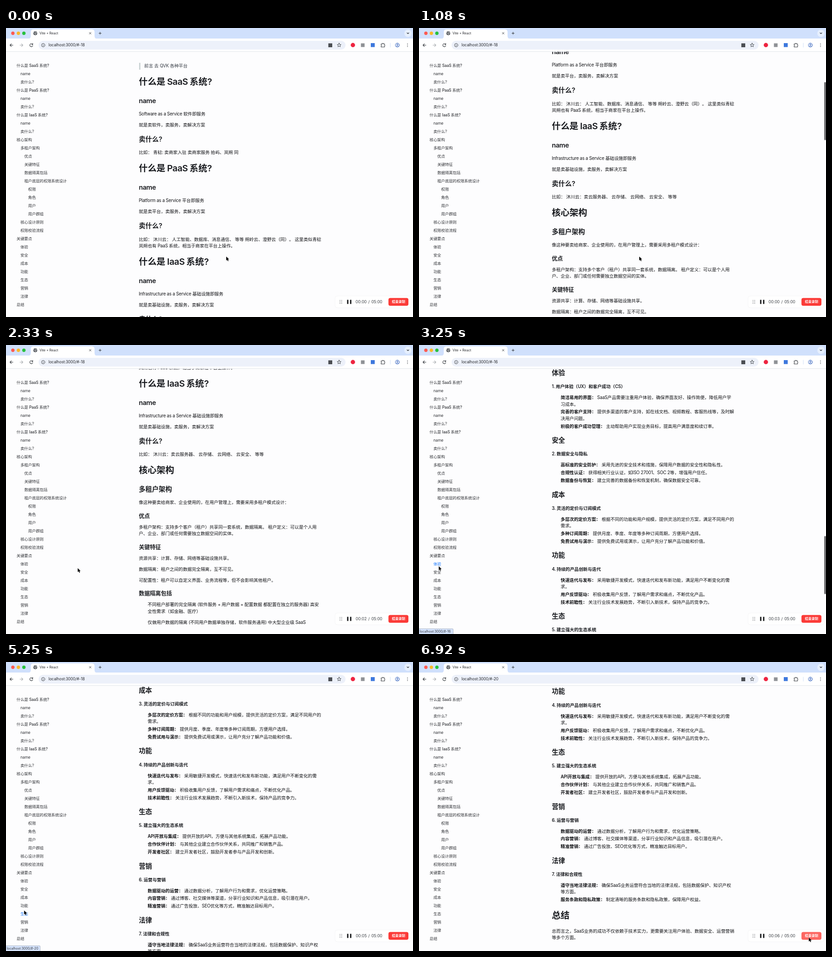
An HTML page that plays this animation: 887 px wide and 631 px high, repeating every 7.16 s.

```html
<!DOCTYPE html>
<html lang="zh-CN">
<head>
<meta charset="utf-8">
<title>Vite + React</title>
<style>
html, body { margin: 0; width: 100%; height: 100%; overflow: hidden; background: #fdfdfe; }
body { position: relative; font-family: Inter, "Noto Sans CJK SC", "Noto Sans CJK", sans-serif; text-spacing-trim: space-all; }
#page, #doc, #ui, #cursor, #thumb, #tip, #widget, .t { position: absolute; left: 0; top: 0; }
#page { top: 52px; width: 887px; height: 579px; overflow: hidden; }
#doc { will-change: transform; }
#ui, #widget { width: 887px; height: 631px; }
#thumb { left: 883px; width: 4px; height: 126.5px; border-radius: 2px; background: #717173; }
#tip { top: 619px; width: 75px; height: 12px; background: #d5e3fc; border: solid #b4bdcc; border-width: 1px 1px 0 0;
  border-radius: 0 3px 0 0; box-sizing: border-box; overflow: hidden; }
.t { white-space: pre; line-height: 20px; }
.t i { font-style: normal; letter-spacing: var(--track); }
.t b { font-weight: 600; }
.h1 i { word-spacing: -.03em; }
.right { left: auto; text-align: right; }
</style>
</head>
<body>
<div id="page"><div id="doc"></div></div>
<div id="side"></div>
<div id="thumb"></div>

<svg id="ui" viewBox="0 0 887 631" fill="none" stroke-linecap="round" stroke-linejoin="round">
  <path d="M0 0H887V24H0Z" fill="#d0e0fc"/>
  <path d="M0 23H887V51H0Z" fill="#fff"/>
  <path d="M0 51.5H887" stroke="#e2e5ea"/>
  <path d="M48 23.5Q54 23.5 54 17.5V9Q54 3 60 3H187Q193 3 193 9V17.5Q193 23.5 199 23.5Z" fill="#fff"/>
  <circle cx="15" cy="11.5" r="3.7" fill="#ff5b52"/>
  <circle cx="27" cy="11.5" r="3.7" fill="#f9b829"/>
  <circle cx="39" cy="11.5" r="3.7" fill="#27c13f"/>
  <circle cx="63.8" cy="11.5" r="4.4" fill="#55595e"/>
  <path d="M60.5 10.6C62.5 11 62.8 12 64 12.2S63.8 14 63.5 15M63.6 7.9C63.3 9.4 65.3 9.2 65.2 10.4S66.8 11.2 67.3 10.8" stroke="#fff" stroke-width="1"/>
  <g stroke="#33363b" stroke-width="1">
    <path d="M181.7 9.7L185.3 13.3M185.3 9.7L181.7 13.3M202.5 11.5H207.5M205 9V14"/>
  </g>
  <circle cx="876" cy="11.5" r="8" fill="#e6effe"/>
  <path d="M874 10.5L876 12.5L878 10.5" stroke="#33363b" stroke-width="1.1"/>
  <rect x="71" y="28" width="669" height="19" rx="9.5" fill="#edf1fa"/>
  <path d="M15.2 37.5H8.8M11.7 34.5L8.7 37.5L11.7 40.5" stroke="#3c4045" stroke-width="1.1"/>
  <path d="M30.3 37.5H36.7M33.8 34.5L36.8 37.5L33.8 40.5" stroke="#aeb1b5" stroke-width="1.1"/>
  <path d="M58 35.8A3.3 3.3 0 1 0 58.3 38.6M58.4 33.8V36.2H56" stroke="#3c4045" stroke-width="1.1"/>
  <circle cx="81" cy="37.5" r="3.7" stroke="#3c4045" stroke-width=".9"/>
  <path d="M81 37.3V39.3M81 35.6V35.7" stroke="#3c4045" stroke-width="1"/>
  <rect x="702.5" y="33.5" width="8.5" height="8.5" fill="#4a4d52"/>
  <path id="star" stroke="#3c4045" stroke-width=".9"/>
  <circle cx="756" cy="37.3" r="4.7" fill="#ee2440"/>
  <rect x="773.5" y="33.5" width="8" height="8" fill="#8f9296"/>
  <rect x="795" y="33" width="8.6" height="8.6" fill="#3d78dd"/>
  <path d="M817.5 34.7H820.2A1.3 1.3 0 0 1 822.8 34.7H825V37A1.3 1.3 0 0 1 825 39.3V41.5H817.5V39.3A1.2 1.2 0 0 0 817.5 37Z" stroke="#3c4045" stroke-width="1.1"/>
  <path d="M837.5 33V42" stroke="#d3e0f8"/>
  <g stroke="#2456b8" stroke-width=".9">
    <circle cx="853" cy="37.3" r="4.4"/><circle cx="853" cy="36.2" r="1.5"/><path d="M850 40.2Q853 37.8 856 40.2"/>
  </g>
  <path d="M875 34.2V34.2M875 37.3V37.3M875 40.4V40.4" stroke="#3c4045" stroke-width="1.6"/>
</svg>

<svg id="widget" viewBox="0 0 887 631">
  <rect x="716.5" y="584.5" width="167" height="27" rx="6" fill="#000" opacity=".035"/>
  <rect x="717.5" y="585.5" width="165" height="25" rx="5" fill="#fff"/>
  <path d="M728 594.7V594.7M731.6 594.7V594.7M728 598V598M731.6 598V598M728 601.3V601.3M731.6 601.3V601.3" stroke="#55585d" stroke-width="1.6" stroke-linecap="round"/>
  <path d="M743.3 593.5H746.3V602.5H743.3ZM749.7 593.5H752.7V602.5H749.7Z" fill="#1d1e20"/>
  <rect id="stop" x="833.5" y="589.5" width="43.5" height="17" rx="4"/>
</svg>
<div id="labels"></div>
<div id="tip"></div>
<svg id="cursor" width="12" height="16" viewBox="-2 -2 12 16" overflow="visible">
  <path d="M0 0V8.7L2 6.9L3.4 10.1L5 9.4L3.6 6.3H6.3Z" fill="#000" stroke="#fff" stroke-width=".9" paint-order="stroke"/>
</svg>

<script>
const $ = id => document.getElementById(id);
const LOOP = 7160, FPS = 12;

// One line of text, centred vertically on y; Latin runs get their own tracking.
function text(parent, x, y, size, str, { weight = 400, color = '#3c4045', track = -.01, cls = '' } = {}) {
  const el = document.createElement('div');
  el.className = 't ' + cls;
  el.style.cssText = `top:${y - 10}px;font-size:${size}px;font-weight:${weight};color:${color};--track:${track}em;` +
    (cls === 'right' ? `right:${887 - x}px` : `left:${x}px`);
  parent.append(el);
  el.put = s => {
    if (s !== el.raw) el.innerHTML = (el.raw = s).replace(/^[^：]*：(?= )/, m => cls === 'l' ? `<B>${m}</B>` : m)
      .replace(/<\/?B>|[ -;=?-~]+/g, m => m[0] === '<' ? m.toLowerCase() : `<i>${m}</i>`);
  };
  el.put(str);
  return el;
}

// Article: the first letter of each line is its kind (w, v: wrapped lines; m: spaced item).
const intro = `q前言 去 QVK 各种平台
1什么是 SaaS 系统?
2name
pSoftware as a Service 软件即服务
p就是卖软件，卖服务，卖解决方案
2卖什么?
p比如： 青稔: 卖商家入驻 卖商家服务 拾屿、岚朔 同
1什么是 PaaS 系统?
2name
pPlatform as a Service 平台即服务
p就是卖平台，卖服务，卖解决方案
2卖什么?
p比如： 沐川云： 人工智能、数据库、消息通信、 等等 朔岭云、澄野云（同）。 这里类似青稔
w岚朔也有 PaaS 系统，相当于商家在平台上操作。
1什么是 IaaS 系统?
2name
pInfrastructure as a Service 基础设施即服务
p就是卖基础设施，卖服务，卖解决方案
2卖什么?
p比如： 沐川云：卖云服务器、 云存储、 云网络、 云安全、 等等
1核心架构
2多租户架构
p像这种要卖给商家、企业使用的，在用户管理上，需要采用多租户模式设计：
3优点
p多租户架构：支持多个客户（租户）共享同一套系统，数据隔离。 租户定义：可以是个人用
w户、企业、部门或任何需要独立数据空间的实体。
3关键特征
p资源共享：计算、存储、网络等基础设施共享。
p数据隔离：租户之间的数据完全隔离，互不可见。
p可配置性：租户可以自定义界面、业务流程等，但不会影响其他租户。
3数据隔离包括
l不同租户部署的完全隔离 (软件服务 + 用户数据 + 配置数据 都配置在独立的服务器) 高安
v全性需求（如金融、医疗）
m仅做用户数据的隔离 (不同用户数据单独存储，软件服务通用) 中大型企业级 SaaS`;

const points = `2体验
41. 用户体验（UX）和客户成功（CS）
l简洁易用的界面： SaaS产品需要注重用户体验，确保界面友好、操作简便，降低用户学
v习成本。
l完善的客户支持： 提供多渠道的客户支持，如在线文档、视频教程、客服热线等，及时解
v决用户问题。
l积极的客户成功管理： 主动帮助用户实现业务目标，提高用户满意度和续订率。
2安全
42. 数据安全与隐私
l高标准的安全防护： 采用先进的安全技术和措施，保障用户数据的安全性和隐私性。
l合规性认证： 获得相关行业认证，如ISO 27001、SOC 2等，增强用户信任。
l数据备份与恢复： 建立完善的数据备份和恢复机制，确保数据安全可靠。
2成本
43. 灵活的定价与订阅模式
l多层次的定价方案： 根据不同的功能和用户规模，提供灵活的定价方案，满足不同用户的
v需求。
l多种订阅周期： 提供月度、季度、年度等多种订阅周期，方便用户选择。
l免费试用与演示： 提供免费试用或演示，让用户充分了解产品功能和价值。
2功能
44. 持续的产品创新与迭代
l快速迭代与发布： 采用敏捷开发模式，快速迭代和发布新功能，满足用户不断变化的需
v求。
l用户反馈驱动： 积极收集用户反馈，了解用户需求和痛点，不断优化产品。
l技术前瞻性： 关注行业技术发展趋势，不断引入新技术，保持产品的竞争力。
2生态
45. 建立强大的生态系统
lAPI开放与集成： 提供开放的API，方便与其他系统集成，拓展产品功能。
l合作伙伴计划： 与其他企业建立合作伙伴关系，共同推广和销售产品。
l开发者社区： 建立开发者社区，鼓励开发者参与产品开发和创新。
2营销
46. 运营与营销
l数据驱动的运营： 通过数据分析，了解用户行为和需求，优化运营策略。
l内容营销： 通过博客、社交媒体等渠道，分享行业知识和产品信息，吸引潜在用户。
l精准营销： 通过广告投放、SEO优化等方式，精准触达目标用户。
2法律
47. 法律和合规性
l遵守当地法律法规： 确保SaaS业务运营符合当地的法律法规，包括数据保护、知识产权
v等方面。
l服务条款和隐私政策： 制定清晰的服务条款和隐私政策，保障用户权益。
1总结
p总而言之，SaaS业务的成功不仅依赖于技术实力，更需要关注用户体验、数据安全、运营营销
w等多个方面。`;

// Distance between the centres of two neighbouring lines, by kind.
const gap = { q1: 34, 12: 41.5, '2p': 29.5, pp: 24, p2: 30.8, p1: 34, pw: 14.5, p3: 29.5, '3p': 24, '3l': 24,
  24: 30.1, '4l': 24, ll: 16.75, lv: 14.5, lm: 24, l2: 30.7, l1: 34.3, '1p': 34.5 };
const sizes = { 1: 19.28, 2: 14.46, 3: 12.05 };

function article(src, y) {
  let prev = '';
  for (const line of src.split('\n')) {
    const kind = line[0], head = kind > '0' && kind < '9';
    if (prev) y += gap[prev + kind];
    const x = kind === 'q' ? 301.3 : 'lvm'.includes(kind) ? 308.8 : 289.4;
    text($('doc'), x, y - 52, sizes[kind] || 9.64, line.slice(1), {
      weight: head ? 600 : 400, track: -.023, cls: head ? 'h' + kind : kind,
      color: kind === 'q' ? '#343a42' : head ? '#1a1c20' : '#101114' });
    prev = { w: 'p', v: 'l', m: 'l' }[kind] || kind;
  }
}
article(intro, 83);
article(points, 1719);
const bar = document.createElement('div');
bar.style.cssText = 'position:absolute;left:290px;top:24px;width:2.5px;height:14.5px;background:#cdd5d6';
$('doc').append(bar);

// Sidebar: depth digit + label.
const items = `0什么是 SaaS 系统? 1name 1卖什么? 0什么是 PaaS 系统? 1name 1卖什么? 0什么是 IaaS 系统? 1name 1卖什么?
0核心架构 1多租户架构 2优点 2关键特征 2数据隔离包括 2租户底层的权限系统设计 3权限 3角色 3用户 3用户群组 1核心设计原则
1权限校验流程 0关键要点 1体验 1安全 1成本 1功能 1生态 1营销 1法律 0总结`.split(/\s+(?=\d)/).map((s, i) => {
  const x = 23 + s[0] * 8.44;
  const el = text($('side'), x, 82 + i * 18, 8.44, s.slice(1), { weight: s[0] === '0' ? 500 : 400, color: '#303236' });
  return { x, el };
});

const labels = $('labels'), host = 'localhost:3000/#-';
text(labels, 73, 11.5, 7.23, 'Vite + React', { color: '#26282c' });
const url = text(labels, 92.7, 37, 8.44, host, { color: '#26282c' });
const clock = text(labels, 786, 598, 8.75, '', { cls: 'right' });
text(labels, 789.5, 598, 8.75, '/');
text(labels, 820, 598, 8.75, '05:00', { cls: 'right' });
text(labels, 841, 598, 7.25, '结束录制', { weight: 600, color: '#fff' });
const status = text($('tip'), 1.5, 6, 7.23, host, { color: '#33373d' });

$('star').setAttribute('d', 'M' + Array.from({ length: 10 }, (_, i) => {
  const r = i % 2 ? 2 : 4.5, a = i * Math.PI / 5;
  return `${726 + r * Math.sin(a)} ${37.5 - r * Math.cos(a)}`;
}).join('L') + 'Z');

const linear = k => k, smooth = k => k * k * (3 - 2 * k);

// Keys are [tick, ...values]; returns the values at a tick.
function at(keys, tick, ease) {
  const n = keys.findIndex(k => k[0] > tick);
  if (n < 1) return (n ? keys[keys.length - 1] : keys[0]).slice(1);
  const a = keys[n - 1], b = keys[n], k = ease((tick - a[0]) / (b[0] - a[0]));
  return a.slice(1).map((v, i) => v + (b[i + 1] - v) * k);
}

const scrollKeys = [[6, 0], [7, 6], [8, 40], [9, 88], [11, 207], [13, 296], [15, 361], [17, 404], [18, 418], [19, 426],
  [33, 426], [34, 1658], [51, 1658], [52, 1923], [63, 1923], [64, 2053]];
const cursorKeys = [[22, 480, 499], [31, 43, 483], [39, 43, 483], [46, 39, 511.5], [47, 39, 511.5], [49, 38.5, 515],
  [56, 38.5, 515], [61, 39.5, 542.5], [68, 39.5, 542.5], [74, 878, 608], [78, 878, 608], [80, 847, 604],
  [81, 847, 604], [83, 849.5, 601.5]];
const secondTicks = [16, 28, 39, 51, 63, 74], stopTicks = [19, 34, 52, 64];

function draw(ms) {
  const tick = Math.floor((ms + 4) * FPS / 1000);
  const [scroll] = at(scrollKeys, tick, linear);
  const [cx, cy] = at(cursorKeys, tick, smooth);

  $('doc').style.transform = `translateY(${-Math.round(scroll)}px)`;
  const idle = tick - (stopTicks.filter(s => s <= tick).pop() ?? tick);
  $('thumb').style.transform = `translateY(${53 + scroll * .2195}px)`;
  $('thumb').style.opacity = tick < 7 ? 0 : Math.max(0, Math.min(1, 1 - (idle - 5) / 3));

  const row = Math.round((cy - 82) / 18), item = items[row];
  const over = item && cx >= item.x && cx < item.x + 17 ? row : -1;
  items.forEach(({ el }, i) => el.style.color = i === over ? '#1677ff' : '#303236');

  $('tip').hidden = tick < 33 || tick > 69;
  status.put(host + ((over < 0 ? 26 : over) - 6));
  url.put(host + (tick < 34 ? 18 : tick < 52 ? 16 : tick < 64 ? 18 : 20));
  clock.put('00:0' + secondTicks.filter(s => s <= tick).length);

  const onStop = cx > 833 && cx < 877 && cy > 589 && cy < 607;
  $('stop').setAttribute('fill', onStop ? '#fc6660' : '#fb3a37');
  $('cursor').style.transform = `translate(${cx - 2}px,${cy - 2}px)`;
}

const start = performance.now();
(function loop() {
  draw((performance.now() - start) % LOOP);
  requestAnimationFrame(loop);
})();
</script>
</body>
</html>
```
